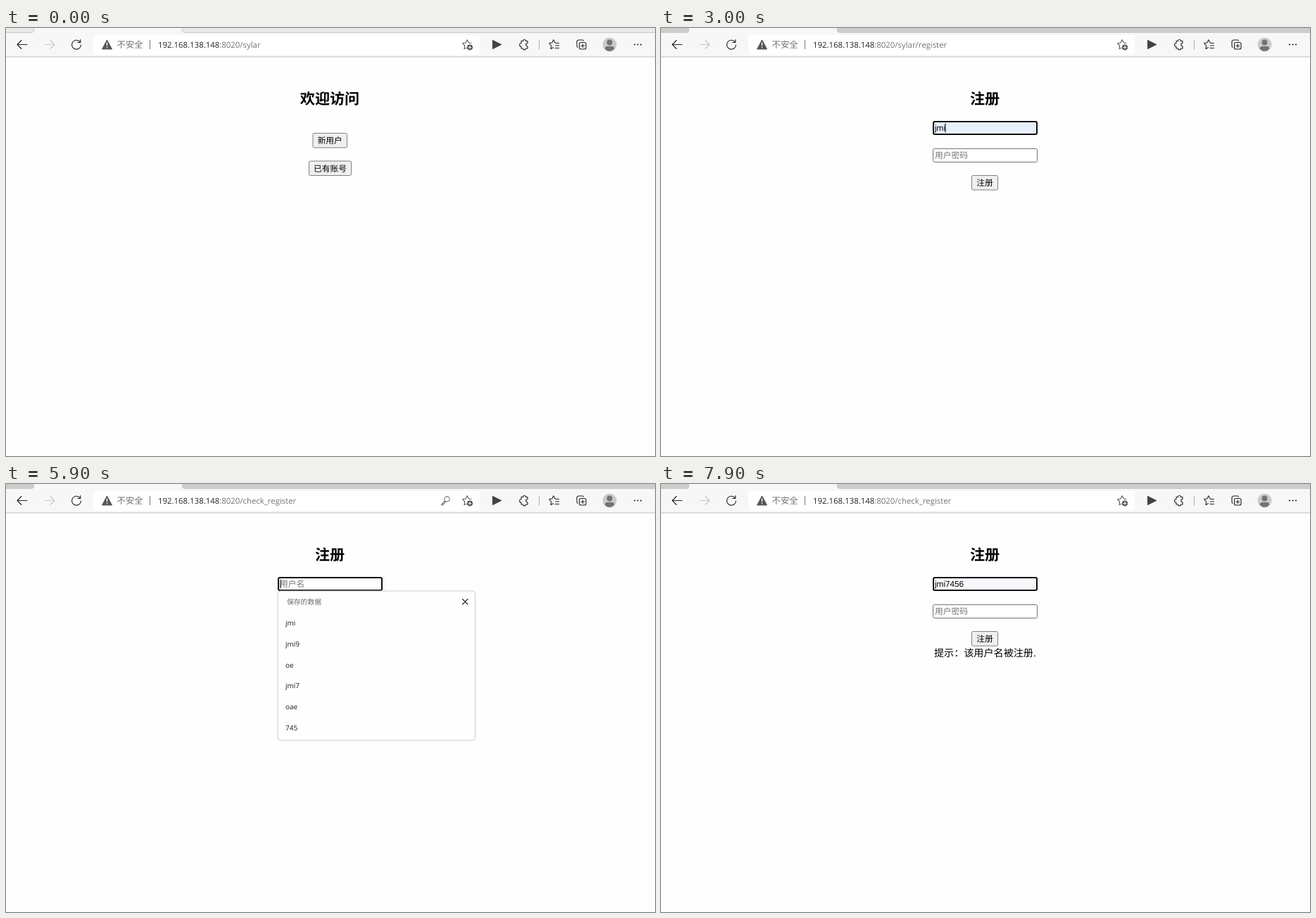
An HTML page that plays this animation: 922 by 608 pixels, repeating every 8000 ms.

```html
<!DOCTYPE html>
<html lang="zh-CN">
<head>
<meta charset="utf-8">
<title>注册</title>
<style>
html, body { margin: 0; width: 100%; height: 100%; overflow: hidden; background: #fefefe; }
svg { display: block; }
text { font-family: "Open Sans", "Noto Sans CJK SC", "Noto Sans CJK", sans-serif; text-rendering: geometricPrecision; white-space: pre; }
.field { font-family: "Liberation Sans", "Noto Sans CJK SC", "Noto Sans CJK", sans-serif; font-size: 11.75px; }
.icon { fill: none; stroke: #222; stroke-width: 1.1; stroke-linecap: round; stroke-linejoin: round; }
</style>
</head>
<body>
<svg width="922" height="608" viewBox="0 0 922 608">
  <rect width="922" height="608" fill="#fefefe"/>
  <rect width="922" height="41" fill="#f7f7f7"/>
  <g id="tabs">
    <path d="M0 0H40V3Q40 6.5 36 6.5H0Z"/>
    <path d="M250 0H922V6.5H254Q250 6.5 250 3Z"/>
  </g>
  <path d="M0 6.5H36Q39.5 6.5 39.5 3V0M250.500 0V3Q250.500 6.5 254 6.5H922" fill="none" stroke="#c9c9c9"/>
  <path d="M0 41H922" stroke="#d2d2d2" stroke-width="1.5"/>
  <rect x="124" y="10" width="549" height="28" rx="4" fill="#fff"/>
  <g class="icon">
    <path d="M30 23.500H16.500M22 17.500L16 23.500L22 29.500"/>
    <path d="M55 23.500H68.500M63 17.500L69 23.500L63 29.500" stroke="#c9c9c9"/>
    <path id="reload" d="M104.800 19.300A6.500 6.500 0 1 0 106.500 24M105.800 16.500V20.500H101.800"/>
    <path id="stop" d="M95 19L105 29M105 19L95 29"/>
    <path d="M661 21.500L657.500 21L655.200 16.800L653 21L648.500 21.700L651.700 25L651 29.600L654 28.200" stroke="#555"/>
    <circle cx="659" cy="27.500" r="4" fill="#555" stroke="none"/>
    <path d="M657 27.500H661M659 25.500V29.500" stroke="#fff"/>
    <path d="M691.500 17.500V29.500L703.500 23.500Z" fill="#444" stroke="#444"/>
    <path d="M732 18.500H734.500A2 2 0 0 1 738.500 18.500H741V21.500A2.200 2.200 0 0 0 741 26V29H738.500A2 2 0 0 1 734.500 29H732V26.300A2.300 2.300 0 0 1 732 21.500Z"/>
    <path d="M757.500 17.500V30" stroke="#b0b0b0"/>
    <path d="M781 21H780L777.800 16.800L775.700 21L771.500 21.700L774.500 25L774 29.600L777.500 27.800M781.500 21.500H785.500M780.500 25H785.500M780 28.500H785.500"/>
    <rect x="814.500" y="20.500" width="9.500" height="9.500" rx="2"/>
    <path d="M819.250 22.800V27.800M816.800 25.300H821.700M812 27.500Q811 26.500 811 25V20Q811 17 814 17H818.500Q820 17 820.500 18"/>
  </g>
  <path d="M143.500 17L150.500 30H136.500Z" fill="#555" stroke="#555" stroke-linejoin="round"/>
  <path d="M143.500 20.500V25.500M143.500 27V28.600" stroke="#fff" stroke-width="1.4"/>
  <text x="157.500" y="28" font-size="12.4" fill="#707070">不安全</text>
  <path d="M204.500 17V30" stroke="#777"/>
  <text x="216" y="27.600" font-size="11.4" fill="#757575"><tspan fill="#222">192.168.138.148</tspan><tspan id="url"></tspan></text>
  <g id="key" class="icon" stroke="#666" style="stroke:#777">
    <circle cx="626.500" cy="21.500" r="3.600"/>
    <path d="M623.700 24L618.500 29.200V30H621V28H623V26L624.500 24.800"/>
  </g>
  <circle cx="857.500" cy="23.500" r="10" fill="#cbcbcb"/>
  <circle cx="857.500" cy="20.500" r="4" fill="#737373"/>
  <path d="M850.500 29Q851.500 26 854 26H861Q863.500 26 864.500 29Q861.500 33 857.500 33Q853.500 33 850.500 29Z" fill="#737373"/>
  <g fill="#222"><circle cx="893" cy="23.500" r="1.100"/><circle cx="897.500" cy="23.500" r="1.100"/><circle cx="902" cy="23.500" r="1.100"/></g>
  <g id="page"></g>
</svg>
<script>
const LOOP = 8000, STEP = 100;
const SAVED = ['jmi', 'jmi9', 'oe', 'jmi7', 'oae', '745'];
const $ = id => document.getElementById(id);
const show = (id, on) => $(id).setAttribute('visibility', on ? 'visible' : 'hidden');

const text = (s, x, y, size, fill = '#000', more = '') =>
  `<text x="${x}" y="${y}" font-size="${size}" fill="${fill}" ${more}>${s}</text>`;
const heading = s => text(s, 460, 107.7, 21.1, '#000', 'text-anchor="middle" font-weight="700"');
const caret = (x, y) => `<path d="M${x} ${y + 3.5}V${y + 16.5}" stroke="#000"/>`;

function button(s, x, y, w, mood = 'idle') {
  const fill = { idle: '#efefef', hover: '#e4e4e4', down: '#f5f5f5' }[mood];
  const line = { idle: '#808080', hover: '#5a5a5a', down: '#909090' }[mood];
  return `<rect x="${x + .5}" y="${y + .5}" width="${w - 1}" height="20.5" rx="2" fill="${fill}" stroke="${line}"/>` +
    text(s, x + w / 2, y + 15, 11.75, '#000', 'class="field" text-anchor="middle"');
}

function field(y, value, hint, focus, fill = '#fff') {
  const box = focus
    ? `<rect x="387" y="${y + 1}" width="147" height="18" rx="2" fill="${fill}" stroke="#101010" stroke-width="2"/>`
    : `<rect x="386.5" y="${y + .5}" width="148" height="19" rx="2" fill="${fill}" stroke="#767676"/>`;
  return box + text(value || hint, 389, y + 13.7, 11.75, value ? '#000' : '#757575', 'class="field"');
}

function dots(n) {
  let s = '';
  for (let i = 0; i < n; i++) s += `<circle cx="${391.8 + i * 4.2}" cy="180.8" r="1.7"/>`;
  return s;
}

const eye = '<g class="icon"><path d="M514.500 182.500Q516.500 177 521.500 177Q526.500 177 528.500 182.500"/><circle cx="521.500" cy="182.500" r="3"/></g>';
const cross = '<path class="icon" d="M648.500 163.500L656 171M656 163.500L648.500 171"/>';
const bin = '<path class="icon" style="stroke:#666" d="M641.500 192.500H653.500M645.500 192.500Q645.500 190.500 647.500 190.500Q649.500 190.500 649.500 192.500M642.800 192.500L643.800 203.500H651.200L652.200 192.500M646 195.500V200.500M649 195.500V200.500"/>';

// Suggestion list; it shrinks towards its centre while it fades.
function popup({ items, alpha = 1, scale = 1, hover = false }) {
  const h = 34.5 + 29.6 * items.length, cx = 526.3, cy = 152 + h / 2;
  let s = `<rect x="386" y="152" width="280.5" height="${h}" rx="4" fill="#fefefe" stroke="#cdcdd3"/>` +
    text('保存的数据', 399, 171, 9.8, '#6b6b6b') + cross;
  if (hover) s += '<rect x="390" y="182.500" width="242" height="29" rx="1" fill="#e1eefa" stroke="#69a7d9"/>' + bin;
  items.forEach((name, i) => {
    s += text(name, 397, 201.4 + i * 29.65, 10, '#1b1b1b', hover && !i ? 'font-weight="700"' : '');
  });
  return `<g opacity="${alpha}" transform="translate(${cx} ${cy}) scale(${scale}) translate(${-cx} ${-cy})">${s}</g>`;
}

const closing = (t, start, items, hover) => {
  const k = (t - start) / STEP;
  return { items, hover, alpha: k < 1 ? .7 : .27, scale: k < 1 ? .985 : .96 };
};

function listAt(t) {
  const within = (a, b) => t >= a && t < b;
  if (within(2100, 2800)) return { items: SAVED, hover: t >= 2500 };
  if (within(2800, 3000)) return closing(t, 2800, SAVED, true);
  if (within(5800, 6500)) return { items: SAVED, hover: t >= 6300, alpha: t < 5900 ? .7 : 1 };
  if (within(6500, 6700)) return closing(t, 6500, SAVED, true);
  const similar = SAVED.filter(s => s.startsWith('jmi'));
  if (within(6900, 7200)) return { items: similar, alpha: t < 7000 ? .7 : 1 };
  if (within(7200, 7400)) return { items: ['jmi7'] };
  if (within(7400, 7600)) return closing(t, 7400, ['jmi7'], false);
}

// Latest value in a [time, value, ...] list.
function at(t, steps) {
  let v = steps[1];
  for (let i = 0; i < steps.length; i += 2) if (t >= steps[i]) v = steps[i + 1];
  return v;
}

function welcome(t) {
  return heading('欢迎访问') +
    button('新用户', 435.5, 149, 49.5, at(t, [0, 'idle', 600, 'hover', 1300, 'down', 1400, 'hover'])) +
    button('已有账号', 430, 188.5, 61);
}

function register(t) {
  const name = at(t, [0, '', 2500, 'jmi', 4500, '', 6300, 'jmi', 6900, 'jm', 7100, 'jmi',
    7200, 'jmi7', 7400, 'jmi74', 7800, 'jmi745', 7900, 'jmi7456']);
  const focus = at(t, [0, 0, 1900, 1, 3300, 2, 4400, 0, 5400, 1]);
  const fill = at(t, [0, '#fff', 2500, '#e8f0fe', 4500, '#fff', 6300, '#e8f0fe', 6900, '#f6f8fb']);
  const typed = t < 4500 ? at(t, [0, 0, 4000, 1, 4100, 2, 4200, 3]) : 0;
  const mood = at(t, [0, 'idle', 4200, 'hover', 4400, 'down', 4500, 'idle', 4800, 'hover', 5000, 'idle']);
  const mark = at(t, [0, 0, 1900, 390, 2600, 0, 2800, 404, 3300, 390, 3800, 0, 4000, 394.5, 4100, 398.5,
    4200, 402.5, 4400, 0, 5400, 390, 5800, 0, 5900, 390, 6500, 404.5, 6900, 401.5, 7100, 404.5,
    7200, 411, 7400, 417.5, 7600, 0, 7800, 424, 7900, 0]);
  let s = heading('注册') + field(132, name, '用户名', focus === 1, fill) +
    field(171, typed ? ' ' : '', '用户密码', focus === 2) + dots(typed);
  if (typed) s += eye;
  if (mark) s += caret(mark, focus === 2 ? 171 : 132);
  if (t >= 6600 && t < 6900) s += '<path d="M389.500 147.500l1.500 -1.500l2 2l2 -2l2 2l2 -2l2 2l2 -2" fill="none" stroke="#e05050" stroke-width=".8"/>';
  s += button('注册', 441, 209, 38, mood);
  if (t >= 4500) s += text('提示：该用户名被注册.', 388, 245.3, 14.1);
  const list = listAt(t);
  return list ? s + popup(list) : s;
}

function draw(t) {
  $('tabs').setAttribute('fill', t < 1300 ? '#e9e9e9' : '#cdcdcd');
  const busy = t >= 1400 && t < 1500;
  show('reload', !busy);
  show('stop', busy);
  show('key', t >= 4000 && t < 6500);
  $('url').textContent = ':8020/' + at(t, [0, 'sylar', 1500, 'sylar/register', 4500, 'check_register']);
  $('page').innerHTML = t < 1500 ? welcome(t) : register(t);
}

let last = -1;
const start = performance.now();
function tick(now) {
  const step = Math.floor(Math.max(0, now - start) % LOOP / STEP);
  if (step !== last) draw((last = step) * STEP);
  requestAnimationFrame(tick);
}
tick(start);
</script>
</body>
</html>
```
